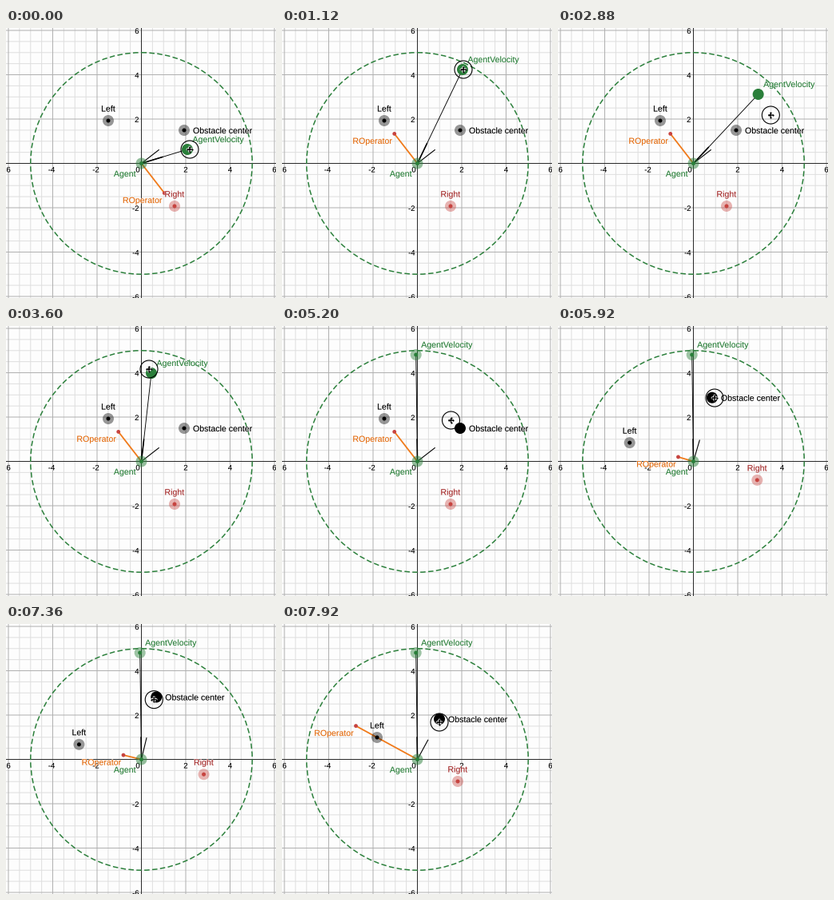
These frames come from a looping animation (338 by 338 pixels, 8000 ms). A matplotlib script:

```python
import numpy as np
import matplotlib.pyplot as plt
from matplotlib.animation import FuncAnimation
from matplotlib.patches import Circle
from matplotlib.patheffects import withStroke

SIZE, DPI = 338, 64
PX = 72 / DPI                      # points per pixel
ORIGIN = np.array([169.5, 169.5])
UNIT = 27.75
FRAMES, INTERVAL = 100, 80
REACH, GAIN = 5, 48                # sensing radius and repulsion strength
VELOCITY_DROP, OBSTACLE_GRAB = 50, 64
GREEN, RED, ORANGE, BLACK = "#2a7f3a", "#c74440", "#f07a1a", "#000000"

# Pointer path: frame, x, y
POINTER = np.array([
    (-1, 227, 152), (0, 230, 152), (5, 284, 146), (13, 226, 52), (14, 227, 52),
    (19, 286, 142), (23, 226, 58), (25, 256, 91), (26, 272, 114), (28, 288, 140),
    (33, 232, 52), (38, 285, 140), (44, 182, 59), (45, 179, 54), (50, 167.7, 36),
    (55, 167.7, 36), (61, 221, 126), (64, 223, 128), (65, 211.5, 118), (70, 176, 88),
    (74, 196, 90), (81, 160, 78), (83, 165, 81), (84, 174, 79.5), (88, 196, 84),
    (93, 184, 98), (98, 197, 119), (99, 197, 123)], float)


def tangents(t, v):
    """Slopes that never overshoot the keys."""
    s = np.diff(v) / np.diff(t)
    m = np.zeros_like(v)
    same = s[1:] * s[:-1] > 0
    m[1:-1][same] = 2 * s[1:][same] * s[:-1][same] / (s[1:] + s[:-1])[same]
    return m


TIMES = POINTER[:, 0]
SLOPES = np.column_stack([tangents(TIMES, POINTER[:, k]) for k in (1, 2)])


def pointer_at(n):
    i = int(np.clip(np.searchsorted(TIMES, n, "right") - 1, 0, len(TIMES) - 2))
    h = TIMES[i + 1] - TIMES[i]
    u = (n - TIMES[i]) / h
    a, b = POINTER[i, 1:], POINTER[i + 1, 1:]
    return ((1 + 2 * u) * (1 - u) ** 2 * a + u * u * (3 - 2 * u) * b
            + h * u * (1 - u) * ((1 - u) * SLOPES[i] - u * SLOPES[i + 1]))


def to_units(p):
    return (p - ORIGIN) / UNIT * (1, -1)


def to_px(v):
    return ORIGIN + np.asarray(v) * (UNIT, -UNIT)


fig = plt.figure(figsize=(SIZE / DPI, SIZE / DPI), dpi=DPI, facecolor="#fdfdfd")
ax = fig.add_axes([0, 0, 1, 1])
ax.set_xlim(0, SIZE)
ax.set_ylim(SIZE, 0)
ax.axis("off")


def text(s, color, size=10.6, ha="center", pos=(0, 0), z=8):
    halo = withStroke(linewidth=1.4 * PX, foreground=(1, 1, 1, 0.6))
    return ax.text(*pos, s, color=color, fontsize=size * PX, ha=ha, zorder=z,
                   va="center_baseline", family="Liberation Sans",
                   path_effects=[halo], clip_on=True)


def line(color, width, z=4):
    return ax.plot([], [], color=color, lw=width * PX, zorder=z, snap=False,
                   solid_capstyle="round")[0]


def disc(radius, color, alpha=1, z=5):
    return ax.add_patch(Circle((0, 0), radius, fc=color, ec="none",
                               alpha=alpha, zorder=z))


class Point:
    """Draggable dot: faint halo with a core, or solid while held."""

    def __init__(self, name, color, offset, ha, label_color=None, faint=0.4):
        self.faint = faint
        self.halo = disc(7, color, faint)
        self.core = disc(2.5, color, z=6)
        self.label = text(name, label_color or color, ha=ha)
        self.offset = np.array(offset)

    def place(self, p, held=False):
        self.halo.center = self.core.center = tuple(p)
        self.halo.set_alpha(1 if held else self.faint)
        self.label.set_position(p + self.offset)


def draw_grid():
    for k in range(-12, 13):
        p = ORIGIN[0] + k * UNIT / 2
        if k == 0:
            color, z = "#2a2a2a", 2
        elif k % 4 == 0:
            color, z = "#b0b0b0", 1.5
        else:
            color, z = "#dfdfdf", 1
        ax.axvline(p, color=color, lw=PX, zorder=z, snap=False)
        ax.axhline(p, color=color, lw=PX, zorder=z, snap=False)
    for v in range(-6, 7, 2):
        x, y = to_px((v, v))
        if v == 0:
            text("0", BLACK, 9.5, pos=(165, 176.5), z=3)
            continue
        text(str(v), BLACK, 9.5, pos=(x - (1.5 if v < 0 else 0), 176.5), z=3)
        text(str(v), BLACK, 9.5, ha="right", pos=(166.5, y), z=3)


draw_grid()
ax.add_patch(Circle(ORIGIN, REACH * UNIT, fill=False, ec=GREEN, lw=1.5 * PX,
                    ls=(0, (4.4, 2.2)), zorder=3))

velocity_line = line(BLACK, 0.9)
velocity_unit = line(BLACK, 1.6)
obstacle_unit = line(BLACK, 1.1)
operator_line = line(ORANGE, 1.8)
operator_tip = disc(2.4, RED, z=6)
operator_label = text("ROperator", "#e36c10", ha="right")

agent = Point("Agent", GREEN, (-6.5, 12.5), "right", faint=0.5)
left = Point("Left", BLACK, (0, -15.5), "center")
right = Point("Right", RED, (0, -15.5), "center", "#a52c2c")
obstacle = Point("Obstacle center", BLACK, (11, 0), "left")
velocity = Point("AgentVelocity", GREEN, (6.5, -13), "left", faint=0.45)
agent.place(ORIGIN)

ring = ax.add_patch(Circle((0, 0), 11, fill=False, ec=BLACK, lw=1.1 * PX, zorder=10))
cross_back = line("white", 3.2, z=11)
cross = line(BLACK, 1.3, z=12)
heads = ax.plot([], [], ls="none", marker="o", ms=2.2 * PX, mew=0,
                color=BLACK, zorder=12)[0]


def ray(artist, end):
    artist.set_data(*np.array([ORIGIN, to_px(end)]).T)


def place_pointer(p, arm=2.8):
    x, y = p
    ring.center = (x, y)
    for artist in (cross_back, cross):
        artist.set_data([x - arm, x + arm, np.nan, x, x],
                        [y, y, np.nan, y - arm, y + arm])
    heads.set_data([x - arm, x + arm, x, x], [y, y, y - arm, y + arm])


def draw(n):
    # Dragged points trail the pointer by one frame.
    vel_px = pointer_at(min(n - 1, VELOCITY_DROP))
    obs_px = pointer_at(max(n - 1, OBSTACLE_GRAB))
    vel, obs = to_units(vel_px), to_units(obs_px)
    dist = np.hypot(*obs)
    side = np.array([-obs[1], obs[0]])

    velocity.place(vel_px, n < VELOCITY_DROP + 4)
    obstacle.place(obs_px, n >= OBSTACLE_GRAB)
    left.place(to_px(side))
    right.place(to_px(-side))

    ray(velocity_line, vel)
    ray(velocity_unit, vel / np.hypot(*vel))
    ray(obstacle_unit, obs / dist)

    # Push towards the side on which the velocity passes the obstacle.
    sign = 1 if side @ vel > 0 else -1
    push = sign * side / dist * GAIN * max(1 / dist - 1 / REACH, 0) / dist ** 2
    tip = to_px(push)
    ray(operator_line, push)
    operator_tip.center = tuple(tip)
    operator_label.set_position(tip + (-2.2, 8.5))

    place_pointer(pointer_at(n))
    return []


anim = FuncAnimation(fig, draw, frames=FRAMES, interval=INTERVAL,
                     init_func=lambda: draw(0), repeat=True, repeat_delay=0)
plt.show()
```
